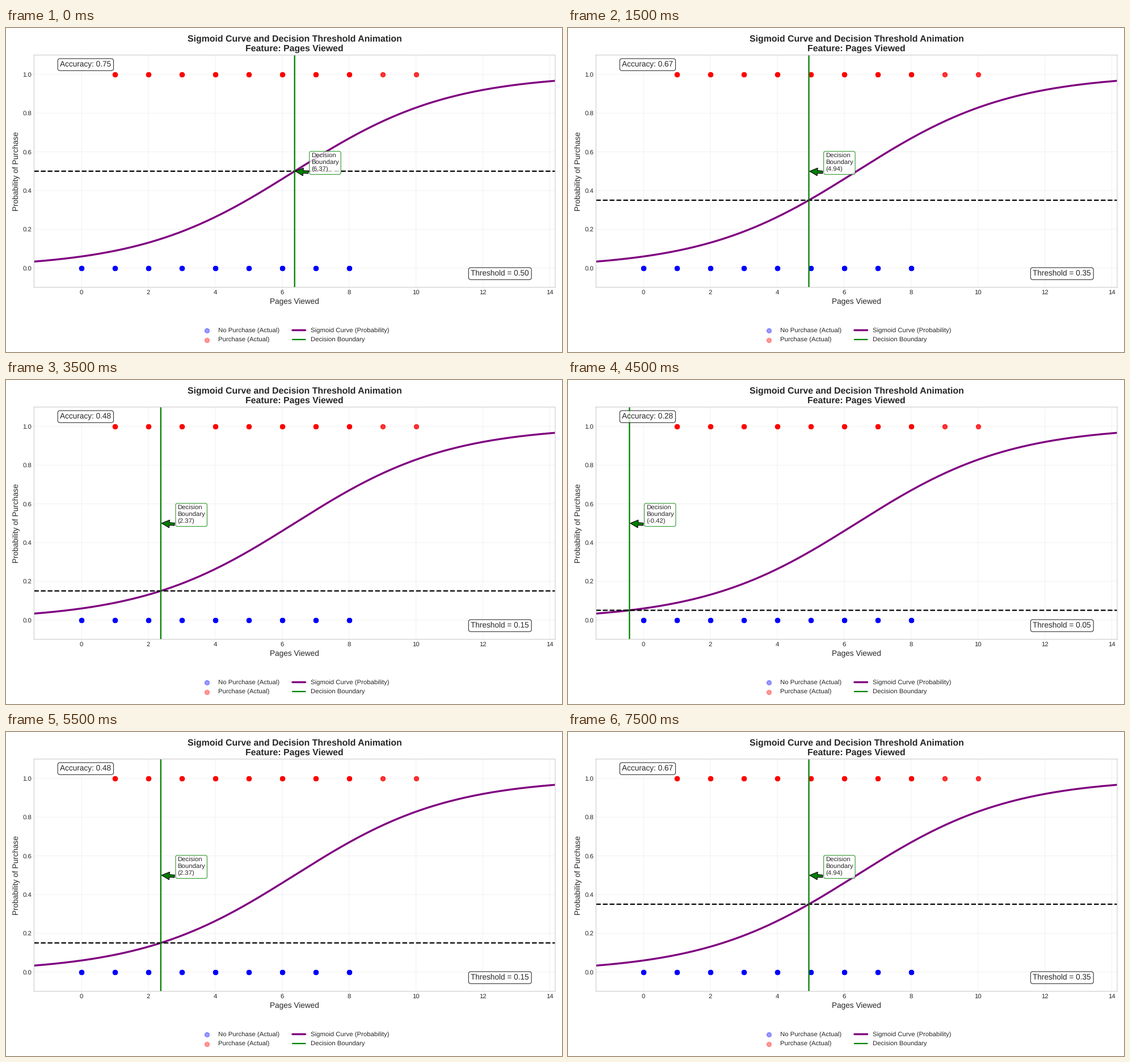
Write a matplotlib script that moves like this. It is 980 by 572 pixels and loops after 8 s.

```python
import numpy as np
import matplotlib.pyplot as plt
from matplotlib.animation import FuncAnimation

plt.style.use("seaborn-v0_8-whitegrid")
# Smooth subpixel placement of glyphs and lines
plt.rcParams.update({"font.family": "Liberation Sans",
                     "text.hinting": "none", "path.snap": False})

W, H = 980, 572
DPI = W / 12
MID, SLOPE = 6.37, 0.4336

# Accuracy by the smallest page count that is predicted as a purchase
ACCURACY = {0: 0.28, 2: 0.37, 3: 0.48, 4: 0.59, 5: 0.67, 6: 0.73, 7: 0.75}


def sigmoid(x):
    return 1 / (1 + np.exp(-SLOPE * (x - MID)))


def boundary_at(p):
    return MID + np.log(p / (1 - p)) / SLOPE


def threshold_at(i):
    """Falls from 0.50 to 0.05 in steps of 0.05, then climbs again."""
    return 0.05 * (1 + abs(9 - i))


def place(left, top, right, bottom):
    return [left / W, 1 - bottom / H, (right - left) / W, (bottom - top) / H]


fig = plt.figure(figsize=(12, 7.0041), dpi=DPI)
ax = fig.add_axes(place(49.4, 47.8, 968, 457.8))
lo, hi = boundary_at(0.05) - 1, boundary_at(0.95) + 1
ax.set(xlim=(lo, hi), ylim=(-0.1, 1.1),
       xticks=range(0, 15, 2), yticks=np.linspace(0, 1, 6))
ax.grid(True, alpha=0.3)
ax.set_title("Sigmoid Curve and Decision Threshold Animation\n"
             "Feature: Pages Viewed", fontsize=14, fontweight="bold")
ax.set_xlabel("Pages Viewed", fontsize=12)
ax.set_ylabel("Probability of Purchase", fontsize=12)

# Repeated visits stack up, so translucent dots turn solid where data is dense
visits = np.repeat(np.arange(9), 12)
buys = np.repeat(np.arange(1, 11), [10] * 8 + [3] * 2)
for pages, y, color, label in (
        (visits, 0, "blue", "No Purchase (Actual)"),
        (buys, 1, "red", "Purchase (Actual)")):
    ax.scatter(pages, np.full(len(pages), y), s=50, c=color, alpha=0.4,
               label=label)

xs = np.linspace(lo, hi, 300)
ax.plot(xs, sigmoid(xs), color="purple", lw=3,
        label="Sigmoid Curve (Probability)")
level = ax.axhline(0.5, color="black", ls="--", lw=2)
wall = ax.axvline(MID, color="green", lw=2, label="Decision Boundary")
ax.legend(loc="upper center", bbox_to_anchor=(0.5, -0.15), ncol=2,
          fontsize=10, labelspacing=0.55)


def box(edge):
    return dict(boxstyle="round,pad=0.3", fc="white", ec=edge, alpha=0.8)


score = ax.text(0.05, 0.95, "", transform=ax.transAxes, fontsize=12,
                bbox=box("black"))
cutoff = ax.text(0.95, 0.05, "", transform=ax.transAxes, fontsize=12,
                 ha="right", bbox=box("black"))
note = ax.annotate("", xy=(MID, 0.5), xytext=(MID + 0.5, 0.5), fontsize=10,
                   bbox=box("green"),
                   arrowprops=dict(facecolor="green", shrink=0.05))


def update(i):
    p = threshold_at(i)
    b = boundary_at(p)
    level.set_ydata([p, p])
    wall.set_xdata([b, b])
    note.xy = (b, 0.5)
    note.set_position((b + 0.5, 0.5))
    note.set_text(f"Decision\nBoundary\n({b:.2f})")
    score.set_text(f"Accuracy: {ACCURACY[int(np.ceil(b))]:.2f}")
    cutoff.set_text(f"Threshold = {p:.2f}")
    return level, wall, note, score, cutoff


anim = FuncAnimation(fig, update, frames=16, interval=500, repeat=True,
                     repeat_delay=0)
plt.show()
```
